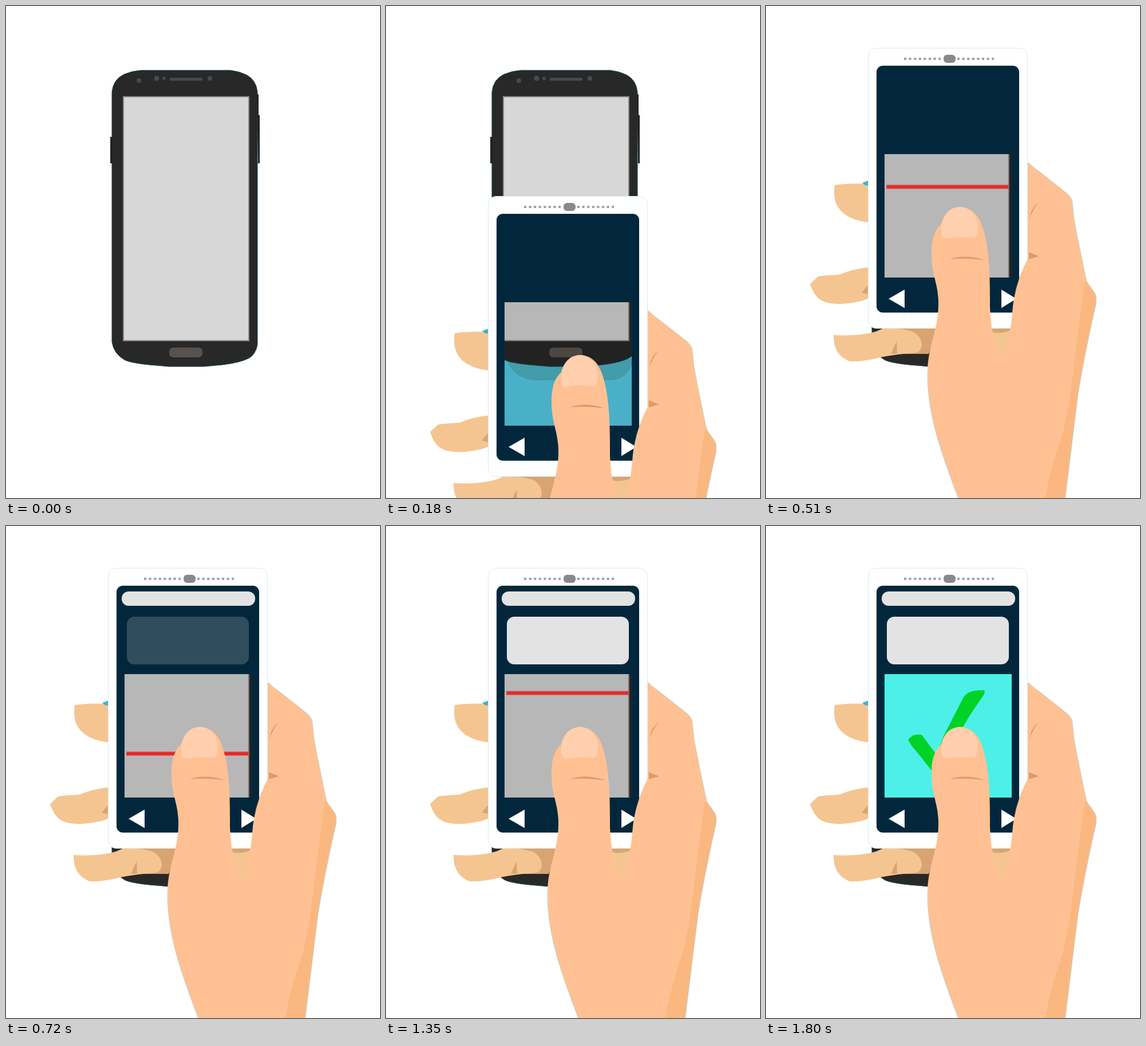
Write an HTML page that moves like this. It is 653 px wide and 857 px high and loops after 3.01 s.

```html
<!DOCTYPE html>
<html lang="en">
<head>
<meta charset="utf-8">
<title>Phone scan</title>
<style>
html, body { margin: 0; width: 100%; height: 100%; overflow: hidden; background: #fff; }
svg { display: block; width: 100%; height: 100%; }
</style>
</head>
<body>
<svg viewBox="0 0 653 857">
  <defs>
    <clipPath id="finder"><rect x="207" y="258" width="222" height="215"/></clipPath>
    <clipPath id="wipe"><rect id="wipeBox" x="245" y="280" width="0" height="165"/></clipPath>
    <path id="body" d="M185 150Q187 128 206 119Q220 113 236 112H392Q408 114 420 120Q437 129 439 150V590Q436 606 425 613Q410 621 378 625L345 628H285L250 625Q220 622 208 617Q188 606 185 585Z"/>
    <g id="phone">
      <use href="#body" fill="#282829" stroke="#1c4b5e"/>
      <path fill="#232425" d="M182 228h5v46h-5zM438 154h3v36h2v84h-3z"/>
      <rect x="205" y="158" width="219" height="425" fill="#d7d7d7" stroke="#858585" stroke-width="2"/>
      <rect x="285" y="595" width="58" height="17" rx="7" fill="#59534d"/>
      <g fill="#4a4a4c">
        <circle cx="232" cy="130" r="4"/>
        <circle cx="263" cy="126" r="4.5"/>
        <circle cx="276" cy="126" r="3"/>
        <circle cx="356" cy="126" r="4"/>
        <rect x="286" y="125" width="57" height="5" rx="2"/>
      </g>
    </g>
  </defs>

  <use href="#phone"/>

  <g id="hand">
    <g id="fingers">
      <path fill="#d9a472" d="M215 560H300L284 606H240Z"/>
      <g fill="#f5c591">
        <path d="M120 312Q145 308 180 310V377Q150 374 133 359Q115 342 120 312Z"/>
        <path d="M180 455Q151 458 128 468Q105 469 91 471L77 484Q84 506 97 513Q108 519 130 519Q162 517 180 509Z"/>
        <path d="M118 573Q160 576 192 567L206 561Q238 561 258 568Q272 577 272 592Q270 602 262 604Q228 606 200 612Q170 620 146 619Q117 608 118 573Z"/>
        <path d="M388 555H434V600L413 625L394 600Z"/>
      </g>
      <path fill="#d9a472" d="M180 484L167 499L180 502ZM228 584L218 606L229 605ZM393 560H428L425 566Q405 572 396 568Z"/>
      <path fill="#35b5cf" d="M168 308L179 304V313L173 312Z"/>
    </g>

    <rect x="178.500" y="73.500" width="278" height="488" rx="14" fill="#fff" stroke="#d3eeee"/>
    <rect x="193" y="104" width="249" height="430" rx="11" fill="#02273c"/>
    <path stroke="#a0a0a0" stroke-width="4" stroke-dasharray="4 4.600" d="M241 92H305M334 92H398"/>
    <rect x="310" y="85" width="21" height="14" rx="6" fill="#898989"/>

    <g clip-path="url(#finder)">
      <g id="view">
        <rect width="653" height="1500" fill="#4ab0c8"/>
        <path fill="#439caa" d="M211 615Q222 650 262 652H395Q425 648 432 615Z"/>
        <use href="#phone"/>
        <use href="#body" opacity=".15"/>
      </g>
      <rect id="done" x="207" y="258" width="222" height="215" fill="#4cf0e8"/>
    </g>
    <path clip-path="url(#wipe)" fill="#00d326" d="M248 372Q257 361 272 364L298 399L310 366L345 298Q353 285 381 286Q384 289 377 299Q350 336 331 374L300 440Q280 414 262 392Q252 381 248 372Z"/>

    <g fill="#e3e3e3">
      <rect id="bar" x="202" y="114" width="233" height="25" rx="12"/>
      <rect id="card" x="211" y="158" width="213" height="83" rx="13"/>
    </g>
    <g id="beam">
      <rect x="210" y="-3" width="214" height="7" fill="#df3030" opacity=".85"/>
      <rect x="212" y="-1" width="210" height="3" fill="#ee2020"/>
    </g>
    <path fill="#fff" d="M214 510L242 494V526ZM411 494L437 510L411 526Z"/>

    <path fill="#ffc193" d="M457 272Q467 282 478 289L525 326Q535 335 535 343L538 372Q547 420 560 480L574 500Q578 507 576 520L570 546Q554 620 545 675L522 861H337C307 780 282 716 282 640C282 590 302 565 301 515C300 480 289 470 289 430C289 400 298 387 306 380C311 360 324 350 340 350C366 352 376 372 383 403C391 440 391 480 391 525C394 575 399 590 413 618C424 590 428 560 431 523Q436 480 457 440Z"/>
    <path fill="#fab880" d="M560 480L574 500Q578 507 576 520L570 546Q554 620 545 675L522 861H487Q496 806 519 740Q530 695 536 640Q546 555 556 482Z"/>
    <path fill="none" stroke="#c3d3ca" d="M337 861C307 780 282 716 282 640M457 272Q467 282 478 289L525 326Q535 335 535 343L538 372Q547 420 560 480L574 500Q578 507 576 520L570 546Q554 620 545 675L522 861"/>
    <path fill="#ffcfae" d="M306 383C311 358 325 350 340 350C360 352 372 372 370 389Q368 403 362 404Q336 400 314 406Q304 405 306 383Z"/>
    <path fill="#dc9a69" d="M320 441Q350 431 383 443Q350 438 320 441ZM459 429L477 436L459 441ZM460 371Q462 353 476 341Q466 354 460 371Z"/>
  </g>
</svg>
<script>
const LOOP = 3010, STEP = 30;
const el = id => document.getElementById(id);
const clamp = v => Math.min(1, Math.max(0, v));
const ramp = (t, a, b) => clamp((t - a) / (b - a));
const fade = (id, v) => el(id).setAttribute('opacity', v);
const shift = (id, y) => el(id).setAttribute('transform', `translate(0 ${y})`);

// The hand rises at constant speed, overshoots and settles.
function rise(t) {
  if (t <= 270) return 844 - 879 * t / 270;
  if (t <= 300) return -35 - 20 * ramp(t, 270, 300);
  const u = ramp(t, 300, 390);
  return -55 * (1 - u * u * (3 - 2 * u));
}

// The beam sweeps down and back up.
function sweep(t) {
  const u = (t - 376) / 523;
  return 262.5 + 203 * (1 - Math.abs(1 - u));
}

function draw(now) {
  const t = Math.floor(now % LOOP / STEP) * STEP;
  const y = rise(t);
  shift('hand', y);
  shift('view', -y);
  shift('beam', sweep(t));
  fade('beam', t > 376 && t < 1425 ? 1 : 0);
  fade('bar', ramp(t, 570, 720));
  fade('card', ramp(t, 690, 840));
  fade('done', ramp(t, 1500, 1590));
  el('wipeBox').setAttribute('width', 142 * ramp(t, 1620, 1800));
}

const start = performance.now();
function tick() {
  draw(performance.now() - start);
  requestAnimationFrame(tick);
}
tick();
</script>
</body>
</html>
```
